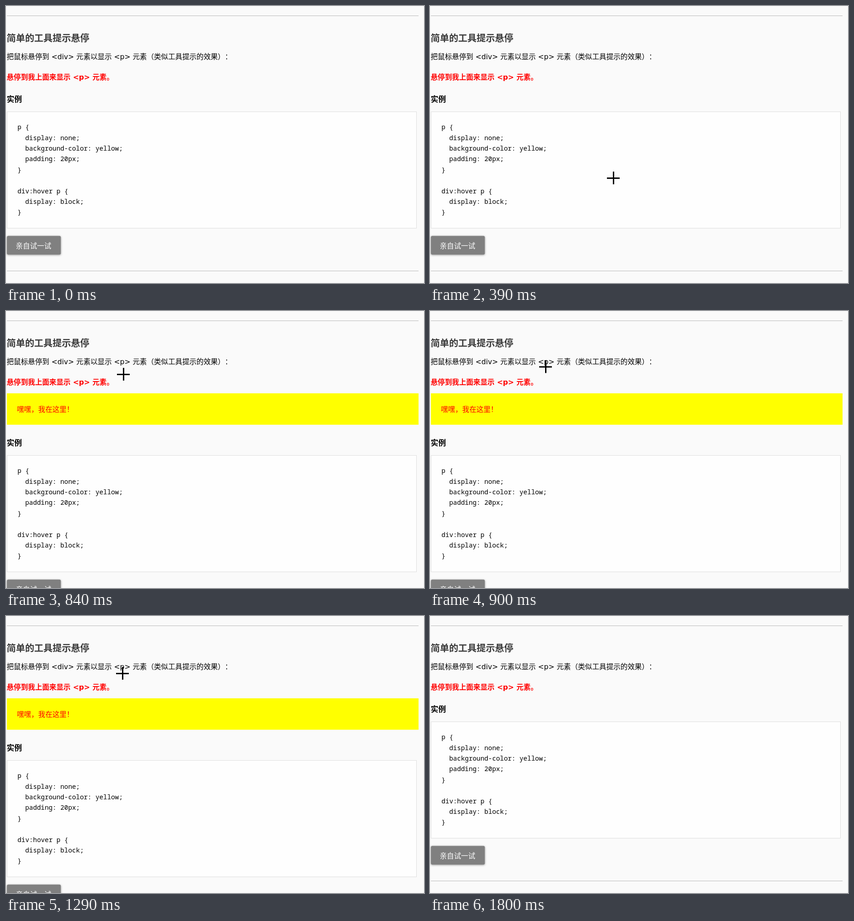
Animation, 919 px wide and 609 px high, one loop 2.04 s. Source, as an HTML page:

```html
<!DOCTYPE html>
<html lang="zh-CN">
<head>
<meta charset="utf-8">
<title>工具提示悬停</title>
<style>
html, body { margin: 0; width: 100%; height: 100%; overflow: hidden; background: #fafafa; }
svg { display: block; width: 919px; height: 609px; }
text {
  font: 15.6px "DejaVu Sans", "Noto Sans CJK SC", "Noto Sans CJK", sans-serif;
  text-spacing-trim: space-all;
  white-space: pre;
}
.title { font-size: 20.2px; font-weight: bold; fill: #3a3a3a; }
.hint { font-weight: bold; fill: #f00; }
.label { font-size: 16.8px; font-weight: bold; }
.code text { font: 500 14.3px "Noto Sans Mono", "DejaVu Sans Mono", monospace; }
.rule { fill: #b8b8b8; }
.button { fill: #808080; filter: drop-shadow(0 1px 2px rgba(0, 0, 0, .4)); }

/* The tip opens twice and pushes the content below it down. */
.tip { animation: show 2040ms step-end infinite; }
.below { animation: push 2040ms step-end infinite; }
.cursor { shape-rendering: crispEdges; animation: move 2040ms infinite; }

@keyframes show {
  0%, 45.58%, 64.7% { visibility: hidden; }
  35.29%, 58.82% { visibility: visible; }
}
@keyframes push {
  0%, 45.58%, 64.7% { transform: translateY(0); }
  35.29%, 58.82% { transform: translateY(85px); }
}
/* One step every 30 ms */
@keyframes move {
  0% { transform: translate(580px, 640px); animation-timing-function: step-end; }
  2.94% { transform: translate(580px, 595px); animation-timing-function: steps(3); }
  7.35% { transform: translate(546px, 537px); animation-timing-function: steps(4); }
  13.23% { transform: translate(473px, 468px); animation-timing-function: steps(4); }
  19.11% { transform: translate(403px, 378px); animation-timing-function: steps(6); }
  27.94% { transform: translate(289px, 211px); animation-timing-function: steps(3); }
  32.35% { transform: translate(261px, 157px); animation-timing-function: steps(3); }
  36.76% { transform: translate(260px, 160px); animation-timing-function: steps(3); }
  41.17% { transform: translate(258px, 139px); animation-timing-function: steps(3); }
  45.58% { transform: translate(252px, 114px); animation-timing-function: steps(3); }
  50% { transform: translate(251px, 66px); animation-timing-function: steps(4); }
  55.88% { transform: translate(250px, 148px); animation-timing-function: steps(2); }
  58.82% { transform: translate(252px, 152px); animation-timing-function: steps(2); }
  61.76% { transform: translate(255px, 142px); animation-timing-function: steps(2); }
  64.7% { transform: translate(257px, 110px); animation-timing-function: steps(2); }
  67.64% { transform: translate(259px, 37px); animation-timing-function: step-end; }
  69.11%, 100% { transform: translate(580px, 640px); animation-timing-function: step-end; }
}
</style>
</head>
<body>
<svg viewBox="0 0 919 609">
  <rect class="rule" x="2" y="21" width="905" height="1"/>
  <text class="title" x="1.5" y="77.5">简单的工具提示悬停</text>
  <text x="1.5" y="116.5">把鼠标悬停到 &lt;div&gt; 元素以显示 &lt;p&gt; 元素（类似工具提示的效果）：</text>
  <text class="hint" x="1.5" y="161.5">悬停到我上面来显示 &lt;p&gt; 元素。</text>

  <g class="tip">
    <rect x="2" y="181" width="905" height="69" fill="#ff0"/>
    <text x="24" y="221.5" fill="#f00">嘿嘿，我在这里！</text>
  </g>

  <g class="below">
    <text class="label" x="1.5" y="210.5">实例</text>
    <rect x="2.5" y="232.5" width="900" height="256" fill="#fefefe" stroke="#dedede"/>
    <g class="code">
      <text x="25.3" y="271.2">p {</text>
      <text x="42.3" y="294.6">display: none;</text>
      <text x="42.3" y="318">background-color: yellow;</text>
      <text x="42.3" y="341.4">padding: 20px;</text>
      <text x="25.3" y="364.8">}</text>
      <text x="25.3" y="411.6">div:hover p {</text>
      <text x="42.3" y="435">display: block;</text>
      <text x="25.3" y="458.4">}</text>
    </g>
    <rect class="button" x="2" y="505.5" width="118.5" height="41" rx="3"/>
    <text x="21.5" y="532.5" fill="#fff">亲自试一试</text>
    <rect class="rule" x="2" y="582" width="905" height="1"/>
  </g>

  <path class="cursor" d="M-14-1h28v3h-28zM-1-14h3v28h-3z"/>
</svg>
</body>
</html>
```
